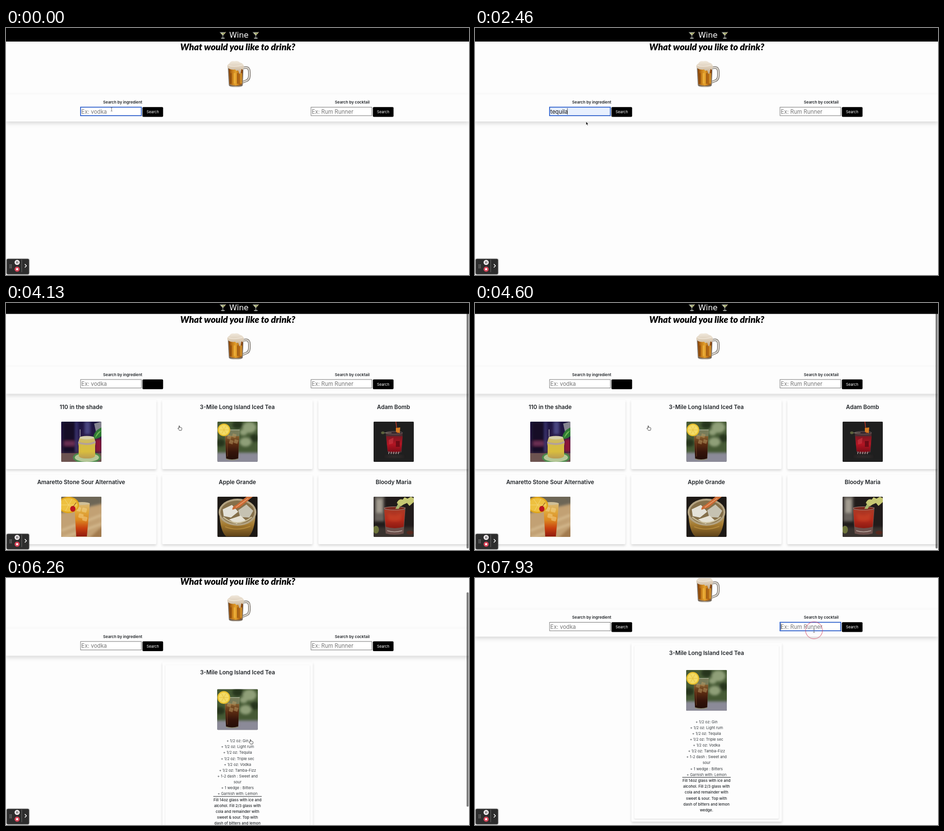
These frames come from a looping animation (956 by 510 pixels, 8000 ms). An HTML page:

```html
<!DOCTYPE html>
<html lang="en">
<head>
<meta charset="utf-8">
<title>Drink finder</title>
<style>
html, body { margin: 0; width: 100%; height: 100%; overflow: hidden; background: #fdfdfd; }
svg { display: block; width: 956px; height: 510px; font-family: Inter, "Open Sans", sans-serif; }
.shadow { filter: drop-shadow(0 4px 4px rgba(0,0,0,.14)); }
.card { filter: drop-shadow(0 3px 2.5px rgba(0,0,0,.15)); }
.mid { text-anchor: middle; }
.label { font-size: 8.1px; font-weight: 600; fill: #212529; }
.name { font-size: 11.65px; font-weight: 600; fill: #212529; }
.field { font-size: 11.5px; fill: #757575; }
.btn { font-size: 7.7px; fill: #fff; }
.item { font-size: 7.75px; fill: #33383c; }
.how { font-size: 7.85px; font-weight: 500; fill: #212529; }
</style>
</head>
<body>
<svg id="stage" viewBox="0 0 956 510" xmlns="http://www.w3.org/2000/svg"></svg>
<script>
const LOOP = 8000;
const stage = document.getElementById('stage');

// ---- building blocks ----
const rect = (x, y, w, h, fill, more = '') =>
  `<rect x="${x}" y="${y}" width="${w}" height="${h}" fill="${fill}" ${more}/>`;
const oval = (x, y, rx, ry, fill, more = '') =>
  `<ellipse cx="${x}" cy="${y}" rx="${rx}" ry="${ry}" fill="${fill}" ${more}/>`;
const path = (d, fill, more = '') => `<path d="${d}" fill="${fill}" ${more}/>`;
const line = (d, color, w, more = '') =>
  path(d, 'none', `stroke="${color}" stroke-width="${w}" ${more}`);
const text = (x, y, cls, s, more = '') =>
  `<text x="${x}" y="${y}" class="${cls}" ${more}>${s}</text>`;
const soft = (s, id = 'haze') => `<g filter="url(#${id})">${s}</g>`;
const grad = (id, vertical, colors) =>
  `<linearGradient id="${id}" x2="${vertical ? 0 : 1}" y2="${vertical ? 1 : 0}">` +
  colors.map((c, i) => `<stop offset="${i / (colors.length - 1)}" stop-color="${c}"/>`).join('') +
  '</linearGradient>';
const blur = (id, dev) => `<filter id="${id}"><feGaussianBlur stdDeviation="${dev}"/></filter>`;

const defs = `<defs>
  ${grad('beer', false, ['#7d3c09', '#c47a18', '#e3a02c', '#b46712', '#7a3a0c'])}
  ${grad('foam', true, ['#f1e9dd', '#dccdb8', '#bfa98c'])}
  ${grad('glass', false, ['#7d776f', '#d5d0c7', '#7d766d'])}
  ${grad('tea', true, ['#86602f', '#5b2c12', '#35140b', '#240d08'])}
  ${grad('sunrise', true, ['#d9b878', '#e0a83c', '#dc8a22', '#c8400f', '#8f1a0e'])}
  ${grad('amber', true, ['#b9a678', '#a47a30', '#5d4219'])}
  ${grad('night', true, ['#1a1440', '#2c1b48', '#4b3040'])}
  ${grad('juice', true, ['#c9bb7a', '#d3bb46', '#d9bd3e', '#b79b55'])}
  ${grad('tomato', true, ['#a93a26', '#b72c1c', '#8c1a12'])}
  ${grad('ruby', true, ['#7c1822', '#b31523', '#7a0c17'])}
  ${blur('haze', 2.5)}${blur('focus', .55)}
  <clipPath id="snap"><rect width="83" height="83" rx="2"/></clipPath>
</defs>`;

// ---- icons ----
const martini = x => `<g transform="translate(${x} 8)">
  ${path('M0 .6H13.5L7.4 7.6H6.1Z', '#8c938c')}
  ${path('M2 2H11.5L6.8 7Z', '#cfcd9e')}
  ${line('M9 5L12.6 0', '#c9a25e', .8)}${oval(7.6, 3.6, 1.5, 1.2, '#78913b')}
  ${line('M6.8 7V12.4', '#b9beb9', 1.1)}${oval(6.8, 12.9, 4, 1, '#b9beb9')}</g>`;

const handle = 'M489 83.5Q491 81.5 496 81.5Q502.500 82 502.500 91V99Q502 107 496 109L488.500 112';
const mug = () =>
  line(handle, '#6b655e', 5) + line(handle, '#cbc6be', 3) + line(handle, '#efece6', 1) +
  path('M458 80L460 118Q461 122.400 474.500 122.400Q488 122.400 489 118L490.500 78Z', 'url(#glass)') +
  path('M459.500 80L461.300 116Q468 119 474.500 119Q482 119 487.500 116L489.300 80Z', 'url(#beer)') +
  [463.500, 470, 477.500, 483.500].map((x, i) =>
    rect(x, 93, i % 2 ? 4 : 2.200, 22, i % 2 ? '#f3bb42' : '#74370a', 'rx="1" opacity=".6"')).join('') +
  line('M461.500 118Q474 121.500 487.500 118', '#54300f', 1.200) +
  path('M457.500 82Q455.500 76 461 73.500Q464 67.500 471 68.500Q479 66.500 482.500 71Q490.500 73 491 79V83Q489.500 88 488 86Q487 83 485.500 87Q484.500 97 481.500 94Q480.500 90 479 87Q476 90 473 85.500Q466 87 460.500 84Z', 'url(#foam)') +
  line('M459 77Q470 82 489 76', '#fbf5ea', 1.2, 'opacity=".8"');

// ---- drink pictures, each on an 83 unit square ----
const photos = {
  jar: rect(0, 0, 83, 83, 'url(#night)') +
    soft(rect(3, 0, 26, 64, '#160d26') + rect(30, 0, 4, 62, '#4a478c', 'opacity=".7"') +
      rect(6, 40, 22, 10, '#6a2f52') + rect(70, 36, 13, 26, '#8d1838') + rect(48, 0, 12, 26, '#4a4480')) +
    rect(0, 65, 83, 18, '#6d5350') + path('M68 4L83 0V14L72 22Z', '#c9cfc4', 'opacity=".6"') +
    path('M66 36Q66 20 83 12V30Q76 36 66 36Z', '#2f7a34') + path('M70 34Q72 22 83 18', '#6cb350') +
    oval(53, 74, 29, 12, '#4c8a4c') + oval(53, 74, 25, 9, '#b4c797') +
    path('M38 33Q34 44 36 50V70Q37 76 53 76Q69 76 70 70V50Q72 42 68 33Z', 'url(#juice)') +
    oval(53, 33, 15, 3.500, '#d5cfa8') + path('M35 41Q52 48 71 40V44Q54 52 35 45Z', '#b3a199') +
    line('M39 31V16', '#c3c1c0', 1.2),
  tea: rect(0, 0, 83, 83, '#465a35') +
    soft([[42, 6, 11], [66, 12, 14], [6, 44, 10], [58, 42, 12], [77, 34, 10], [54, 22, 8]].map(([x, y, r], i) =>
      oval(x, y, r, r * .8, i % 2 ? '#8f9f78' : '#25361f')).join('') + rect(-5, 64, 93, 24, '#8b8a98')) +
    path('M15 17H46L43 78Q30 82 18 78Z', '#8d8b6a', 'opacity=".7"') +
    path('M16 30H45L43 76Q30 80 18 76Z', 'url(#tea)') +
    [[22, 27], [32, 24], [26, 37], [36, 36]].map(([x, y]) =>
      rect(x, y, 8, 8, '#b99a63', `opacity=".5" transform="rotate(18 ${x} ${y})"`)).join('') +
    line('M15 17H46', '#c6ccb4', 1) + line('M20 42L21 72', '#8f5a34', 1, 'opacity=".7"') +
    oval(13.500, 17, 13, 13, '#e8c02c') + oval(13.500, 17, 10.500, 10.500, '#f3dc66') +
    line('M4 17H23M9 9L18 25M18 9L9 25', '#e6c243', 1),
  bomb: rect(0, 0, 83, 83, '#1f1f1f') + soft(oval(43, 72, 20, 3, '#332c2c')) +
    path('M25 23H60L58 63Q43 70 29 63Z', '#4b2f33') + path('M26 30H60L57 61Q43 65 29 61Z', 'url(#ruby)') +
    path('M31 38L41 33L40 45L32 47Z', '#cf3a45', 'opacity=".6"') + rect(46, 40, 8, 12, '#5f0913', 'opacity=".8"') +
    oval(42.500, 23, 17.500, 3, '#38292d', 'stroke="#857876" stroke-width=".7"') +
    line('M16 23H37', '#a39d8c', .9) + oval(19, 23, 3.500, 2.700, '#5c633d') +
    [32, 37, 42, 47, 52].map(x => line(`M${x} 62L${x - 1} 67`, '#b9a5a5', 1.3)).join('') +
    line('M49 24L46 0', '#b23425', 1.6) + path('M46 13L55 12L54 24L46 21Z', '#d67c22'),
  sour: rect(0, 0, 83, 83, '#c2a174') +
    soft(path('M-5 -5H88V14L-5 34Z', '#6d6656') + path('M55 88L88 58V88Z', '#a17a4e') +
      line('M0 70L83 38M0 86L83 56', '#dcc49a', 3)) +
    path('M27 14H59L53 82H31Z', 'url(#sunrise)') + oval(43, 14, 16, 3, '#d0bf97') +
    [[32, 20], [44, 22], [37, 34], [45, 40]].map(([x, y]) =>
      rect(x, y, 10, 9, '#f8dc96', `rx="2" opacity=".45" transform="rotate(14 ${x} ${y})"`)).join('') +
    oval(15, 17, 22, 17, '#dfa51c') + oval(15, 17, 19, 14, '#edc040') +
    line('M-2 17H33M7 5L24 29M22 5L9 29', '#f5d878', 1) +
    oval(24, 25, 5.500, 6, '#b9151f') + line('M25 20L31 12', '#6b2716', 1),
  grande: rect(0, 0, 83, 83, '#1d1915') + path('M4 34Q6 72 18 82H65Q77 70 79 34Z', 'url(#amber)') +
    oval(41.500, 32, 39, 28, '#b3a382') + oval(41.500, 32, 35, 24, '#85704a') +
    soft(path('M11 26L30 17L43 31L28 43L13 40Z', '#e4e2d8') + path('M43 28L60 16L74 29L66 43L47 42Z', '#c6c2b2') +
      path('M24 47L48 39L60 50L39 56Z', '#e6e2d4'), 'focus') +
    line('M12 42Q41 66 71 42', '#c9bc98', 2.500) + line('M16 62Q41 72 68 61', '#c79c48', 2, 'opacity=".6"') +
    path('M60 0H73L46 22L31 27Q30 20 39 17Z', '#c96a35') + line('M64 3L38 22', '#e69a68', 2),
  maria: rect(0, 0, 83, 83, '#211c1b') +
    soft(rect(2, -3, 20, 54, '#69635d') + rect(6, 5, 12, 28, '#a39c90') + rect(-5, 63, 93, 25, '#37312f')) +
    oval(5, 68, 6, 8, '#6d743b') + oval(75, 74, 7, 4, '#57291f') +
    path('M21 22H66L62 76Q44 81 25 76Z', '#6d514c') + path('M22 27H65L62 62Q44 68 25 62Z', 'url(#tomato)') +
    soft(path('M29 34Q43 42 58 33L56 48Q44 54 31 48Z', '#c9432a', 'opacity=".6"')) +
    oval(43.500, 24, 21.500, 3.500, '#7c2a1f', 'stroke="#b39a90" stroke-width=".8"') +
    path('M45 25L55 6L61 8L52 25Z', '#a9b56c') +
    path('M48 13Q52 3 60 6L64 1L70 4L77 0L83 3V11L74 19L69 13L62 16L56 20Z', '#c6c873') +
    line('M28 70Q43 75 59 70', '#b5a39b', 1.500)
};
const photo = (key, x, y, scale = 1) =>
  `<g transform="translate(${x} ${y}) scale(${scale})" clip-path="url(#snap)">
    ${rect(0, 0, 83, 83, '#222')}${soft(photos[key], 'focus')}</g>`;

// ---- page parts ----
const search = (id, x, mid, title, hint) =>
  text(mid, 156, 'label mid', title) +
  rect(x, 163.5, 125.5, 17.5, '#fff', `id="${id}Box" stroke="#767676"`) +
  text(x + 1.5, 176.9, 'field', hint, `id="${id}Text"`) +
  line('M0 165.500V179', '#222', .8, `id="${id}Caret"`) +
  rect(x + 127.7, 163.2, 42.7, 20.3, '#000', 'rx="2"') +
  text(x + 149, 176, 'btn mid', 'Search', `id="${id}Btn"`);

const drinks = [
  ['110 in the shade', 'jar'], ['3-Mile Long Island Iced Tea', 'tea'], ['Adam Bomb', 'bomb'],
  ['Amaretto Stone Sour Alternative', 'sour'], ['Apple Grande', 'grande'], ['Bloody Maria', 'maria']
];
const results = drinks.map(([name, key], i) => {
  const x = i % 3 * 322.5, y = 205.5 + 155 * (i / 3 | 0);
  return rect(x, y, 310.5, 143, '#fdfdfd', 'class="card" rx="2"') +
    text(x + 155.2, y + 19.2, 'name mid', name) + photo(key, x + 114, y + 45);
}).join('');

const parts = ['1/2 oz: Gin', '1/2 oz: Light rum', '1/2 oz: Tequila', '1/2 oz: Triple sec', '1/2 oz: Vodka',
  '1/2 oz: Tamba-Fizz', '1-2 dash : Sweet and', 'sour', '1 wedge : Bitters', 'Garnish with: Lemon'];
const steps = ['Fill 14oz glass with ice and', 'alcohol. Fill 2/3 glass with', 'cola and remainder with',
  'sweet &amp; sour. Top with', 'dash of bitters and lemon', 'wedge.'];
const recipe =
  rect(323, 206, 310.5, 369, '#fdfdfd', 'class="card" rx="2"') +
  rect(329, 212, 298.5, 357, '#fdfdfd', 'style="filter:drop-shadow(0 1px 1px rgba(0,0,0,.14))" rx="2"') +
  text(478, 231.2, 'name mid', drinks[1][0]) + photo('tea', 436, 262, 84 / 83) +
  parts.map((s, i) => text(478, 371.7 + 12.1 * i, 'item mid', (s === 'sour' ? '' : '+ ') + s)).join('') +
  rect(428, 483, 100, 1, '#212529') +
  steps.map((s, i) => text(478, 493.2 + 12.1 * i, 'how mid', s)).join('');

const toolbar =
  rect(1.4, 476.8, 46.2, 31.6, '#2d2d2d', 'rx="2.5" style="filter:drop-shadow(0 .5px 1.5px rgba(0,0,0,.5))"') +
  [0, 1, 2, 3, 4, 5].map(i => rect(7.6 + i % 2 * 2.8, 488.600 + 2.900 * (i >> 1), 1.3, 1.3, '#c8c8c8')).join('') +
  oval(23, 484, 5.3, 5.3, '#f3eef0') + rect(21, 481.7, 1.2, 4.6, '#333') + rect(23.8, 481.7, 1.2, 4.6, '#333') +
  oval(23, 498, 5.3, 5.3, '#d9455a') + rect(21, 496, 4, 4, '#fff', 'rx=".6"') +
  rect(32, 478, .8, 26, '#777') + line('M38.800 487.500L42.300 491L38.800 494.500', '#fff', 1.400);

const pointers = {
  beam: line('M-1.700 -3.800Q0 -3.800 0 -2.500V2.500Q0 3.800 -1.700 3.800M1.700 -3.800Q0 -3.800 0 -2.500M0 2.500Q0 3.800 1.700 3.800', '#555', .8),
  arrow: path('M-1.800 -3.800V3.200L-.2 1.800L1 4.300L2.300 3.700L1.200 1.300H3.200Z', '#111', 'stroke="#fff" stroke-width=".6"'),
  hand: path('M-2 1L-2 -4Q-1.200 -5.400 -.5 -4V-1Q.4 -2 1.100 -.9Q2 -1.700 2.600 -.5Q3.800 -1 4 .4V2.600Q3.800 4 3 5H-1Q-2 3.800 -4 1.300Q-4.200 0 -3 .2Z', '#fff', 'stroke="#333" stroke-width=".9"')
};

stage.innerHTML = defs + rect(0, 0, 956, 510, '#fdfdfd') +
  `<g id="page">
    ${rect(0, 0, 956, 28, '#000')}${martini(441)}${martini(509)}
    ${text(481, 20.3, 'mid', 'Wine', 'fill="#fff" style="font:16px \'DejaVu Sans\',sans-serif"')}
    ${text(478.5, 46, 'mid', 'What would you like to drink?', 'style="font:italic 900 18.7px Lato,sans-serif"')}
    ${mug()}
    ${rect(0, 137, 956, 56, '#fdfdfd', 'class="shadow"')}
    ${search('ing', 154, 241, 'Search by ingredient', 'Ex: vodka')}
    ${search('cock', 629.8, 715, 'Search by cocktail', 'Ex: Rum Runner')}
    <g id="results">${results}</g><g id="recipe">${recipe}</g>
  </g>
  ${rect(951, 0, 4.2, 10, '#000', 'id="bar" rx="2"')}
  ${toolbar}
  ${oval(0, 0, 1, 1, 'none', 'id="ring" stroke="#d03a5c" stroke-width="1.4"')}
  <g id="pointer">${Object.keys(pointers).map(k => `<g id="${k}">${pointers[k]}</g>`).join('')}</g>`;

// ---- motion ----
const $ = id => document.getElementById(id);
const set = (id, attrs) => { for (const k in attrs) $(id).setAttribute(k, attrs[k]); };
const show = (id, on) => set(id, { display: on ? 'inline' : 'none' });
const clamp = v => Math.max(0, Math.min(1, v));
const span = (t, a, b) => clamp((t - a) / (b - a));
const smooth = p => p * p * (3 - 2 * p);
const out = p => 1 - (1 - p) ** 3;

// time, x, y
const route = [[0, 218, 168], [2200, 218, 168], [2460, 231, 197], [3000, 303, 175], [3700, 303, 175],
  [4130, 359, 258], [4600, 359, 258], [5060, 471, 267], [5930, 471, 267], [6200, 506, 338],
  [7130, 506, 338], [7600, 700, 109], [LOOP, 700, 109]];
const clicks = [[330, 218, 168], [3400, 303, 173], [5130, 471, 264], [7640, 700, 108]];
const RING = 380;
const T = { fill: 1600, pick: 2000, hover: 2900, submit: 3400, list: 3600, open: 5200, detail: 5460, focus: 7640 };

function movePointer(t) {
  const i = route.findIndex(k => k[0] > t);
  const [a, b] = [route[i - 1], route[i]];
  const p = smooth(span(t, a[0], b[0]));
  const x = a[1] + (b[1] - a[1]) * p, y = a[2] + (b[2] - a[2]) * p;
  set('pointer', { transform: `translate(${x} ${y})` });
  const kind = t < 2300 || t > 7560 ? 'beam' : t < T.hover || t > 7200 ? 'arrow' : 'hand';
  for (const k in pointers) show(k, k === kind);
}

function drawRing(t) {
  const c = clicks.find(k => t >= k[0] && t < k[0] + RING);
  show('ring', c);
  if (!c) return;
  const p = (t - c[0]) / RING, r = 20 * Math.sqrt(p);
  set('ring', { cx: c[1], cy: c[2], rx: r, ry: r, opacity: .9 - .45 * p });
}

function drawField(id, focus, filled) {
  set(id + 'Box', { stroke: focus ? '#2459c9' : '#767676', 'stroke-width': focus ? 1.7 : 1,
    fill: filled ? '#e8f0fe' : '#fff' });
}

function drawScroll(t) {
  const listing = t < T.open;
  const y = listing ? 5.5 * out(span(t, 3850, 4050)) : 72 * out(span(t, 6200, 6537));
  const total = listing ? 515.5 : 582;
  set('page', { transform: `translate(0 ${-y})` });
  const seen = listing ? span(t, 3850, 3900) : span(t, 6200, 6240) * (1 - span(t, 7130, 7400));
  set('bar', { y: y * 510 / total + 1, height: 510 * 510 / total - 4, opacity: .5 * seen });
}

function render(t) {
  const filled = t >= T.fill && t < T.list;
  drawField('ing', t < T.submit, filled);
  $('ingText').textContent = filled ? 'tequila' : 'Ex: vodka';
  $('ingText').style.fill = filled ? '#111' : '';
  drawField('cock', t >= T.focus, false);

  const beat = t < T.pick ? t - 270 : t - T.pick;
  show('ingCaret', t < T.submit && beat >= 0 && Math.floor(beat / 530) % 2 === 0);
  set('ingCaret', { transform: `translate(${filled ? 190.8 : 155.8} 0)` });
  show('cockCaret', t >= T.focus);
  set('cockCaret', { transform: 'translate(631.7 0)' });

  show('ingBtn', t < T.hover || t >= T.open);
  show('results', t >= T.list && t < T.open);
  show('recipe', t >= T.detail);
  drawScroll(t);
  movePointer(t);
  drawRing(t);
}

function tick(now) {
  render(now % LOOP);
  requestAnimationFrame(tick);
}
render(0);
requestAnimationFrame(tick);
</script>
</body>
</html>
```
